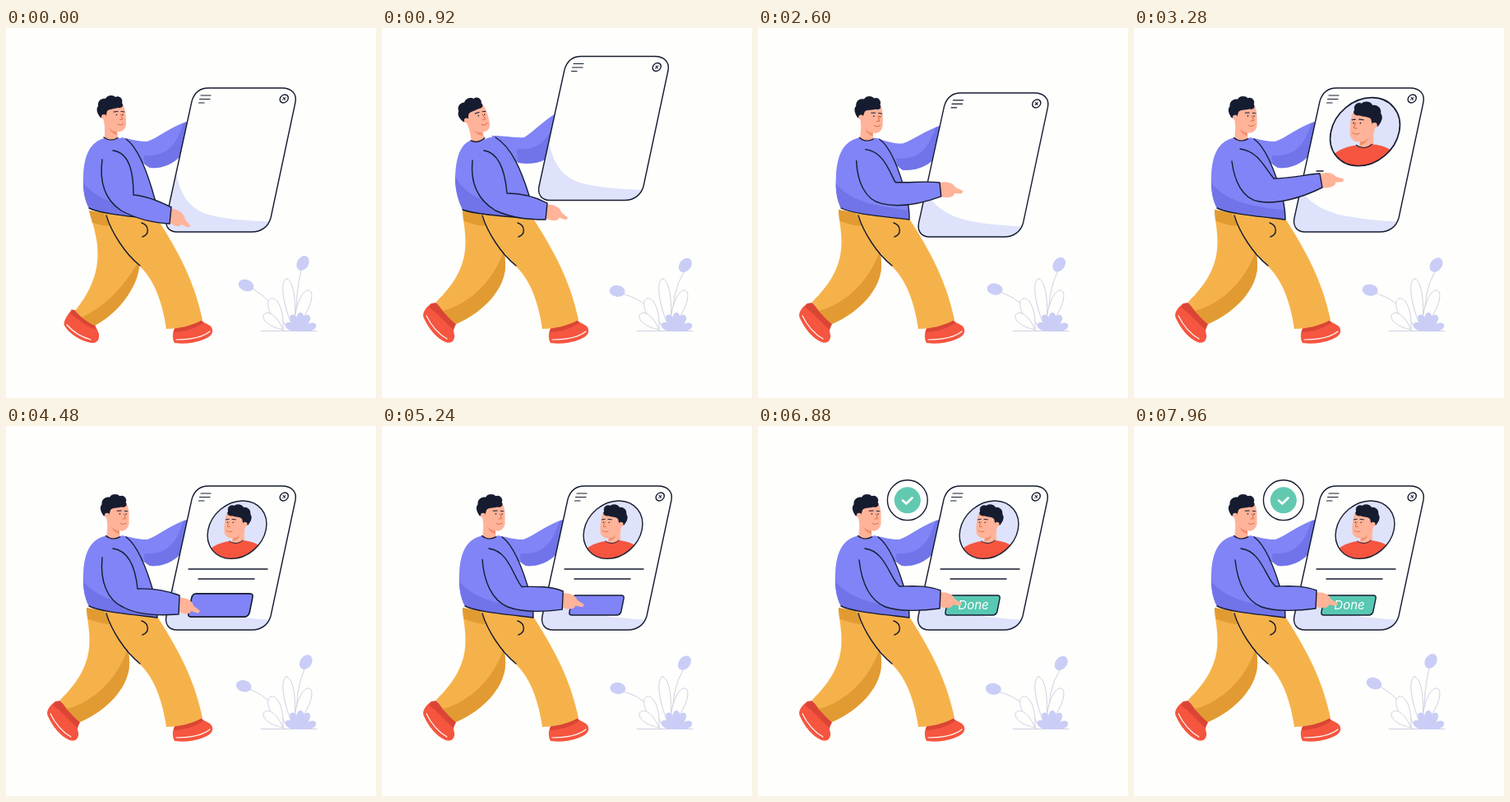
Animation of 450 by 450 pixels, one loop 8 s. Source, as an HTML page with a canvas:

```html
<!DOCTYPE html>
<html lang="en">
<head>
<meta charset="utf-8">
<title>Profile card</title>
<style>
html, body { margin: 0; width: 100%; height: 100%; overflow: hidden; background: #fefefc; }
canvas { display: block; width: 450px; height: 450px; }
</style>
</head>
<body>
<canvas id="stage" width="450" height="450"></canvas>
<script>
const c = document.getElementById('stage').getContext('2d');
const LOOP = 8000, TAU = Math.PI * 2;
const INK = '#161c30', PAPER = '#fefefc', SKIN = '#ffb399', SHIRT = '#8084f6', SHIRT2 = '#7074e8',
  PANTS = '#f6b24a', PANTS2 = '#e29b32', RED = '#f6553f', RED2 = '#db4535',
  PALE = '#dee2fb', PLANT = '#cacdf6', LEAF = '#cbcbe0';

// Key poses; paths of the same name share one structure and can be blended.
const start = {
  head: '0 0 0',
  card: '0 0',
  hand: '200 228 28',
  edge: 'M101,219 C115,226 150,229 184,233 C184,226 184,222 181,208 C172,175 160,145 146,135',
  back: 'C142,133 138,134 136,134 L120,134 C104,138 95,152 94,180 C93,200 97,212 101,219',
  arm: 'M117,160 C113,190 122,210 140,222 C160,233 180,237 199,238 L201,218 C185,210 170,204 155,203 C155,180 152,152 130,149',
  far: 'M140,133 C155,136 162,138 172,138 C184,134 200,120 220,114 L212,156 C202,166 190,171 175,170 L160,160 Z',
  leg: 'M101,222 C108,250 128,290 84,344 C90,351 98,357 108,362 C140,345 162,310 162,288 L150,230 Z',
  legShade: 'M164,278 C150,305 128,335 92,352 L108,364 L180,330 Z',
  shoe: 'M84,344 L80,342 C75,349 69,357 71,362 C78,373 92,381 104,383 C111,384 114,378 113,372 C110,364 108,362 108,360 Z',
  ankle: 'M84,343 L81,343 L78,348 C86,352 98,364 109,366 L108,360 Z',
  sole: 'M74,361 C82,370 92,376 103,379',
  glow: 'M207,176 C212,205 225,222 250,228 C275,234 300,234 324,236 L318,252 L190,252 L190,225 Z'
};
const lifted = {
  ...start,
  head: '-11 2 -12',
  card: '-4 -38.5',
  hand: '200 223 17',
  edge: 'M98,221 C115,227 150,229 184,232 C184,226 182,215 179,204 C170,175 158,145 138,133',
  back: 'C132,132 128,134 126,135 L110,136 C96,140 90,155 89,182 C89,200 94,212 98,221',
  arm: 'M110,161 C107,190 118,210 138,222 C160,232 180,233 199,233 L201,213 C186,205 170,201 152,201 C150,178 144,152 124,149',
  far: 'M133,131 C150,131 162,134 173,133 C186,125 198,111 213,103 L206,155 C195,164 182,166 166,164 L150,155 Z',
  leg: 'M98,221 C99,250 116,285 66,333 C72,342 80,352 90,360 C125,345 152,315 150,285 L145,230 Z',
  legShade: 'M152,255 C144,300 110,335 74,344 L90,362 L170,330 Z',
  shoe: 'M66,336 L60,335 C53,340 48,347 51,353 C57,366 66,377 77,382 C85,385 89,379 88,373 C86,366 88,363 90,360 Z',
  ankle: 'M66,334 L60,335 L57,340 C66,345 76,358 87,367 L90,360 Z',
  sole: 'M54,350 C60,362 68,372 79,378'
};
const lowered = {
  ...lifted,
  head: '10 1 10',
  card: '2.5 27.5',
  hand: '201 236 32',
  edge: 'M101,219 C115,227 150,229 184,233 C185,226 185,222 183,210 C176,175 168,145 154,136',
  back: 'C150,134 147,134 145,134 L128,133 C110,138 100,152 98,182 C96,200 98,212 101,219',
  arm: 'M122,159 C116,190 124,212 142,222 C160,233 180,240 200,244 L203,228 C187,214 172,207 157,205 C157,182 156,152 137,150',
  far: 'M150,135 C165,144 175,150 188,150 C200,148 212,143 225,137 L217,177 C208,182 192,184 177,182 L165,165 Z'
};
const { edge, back, far, card } = start;
const pointing = {
  ...lifted, edge, back, far, card,
  head: '2.5 1 3',
  hand: '228 186 -4',
  arm: 'M119,162 C122,186 132,208 152,211 C175,215 205,206 229,194 L226,177 C210,178 190,183 170,183 C160,172 152,150 129,147',
  glow: 'M203,196 C212,213 235,225 260,229 C280,233 300,234 324,236 L318,252 L190,252 L190,225 Z'
};
const reaching = {
  ...pointing,
  hand: '210 217 18',
  arm: 'M117,160 C114,190 124,212 142,220 C160,230 185,231 210,229 L211,206 C195,200 180,197 160,198 C158,178 152,152 130,149'
};
const pressing = {
  ...pointing,
  hand: '221 211 11',
  arm: 'M123,163 C126,190 136,212 155,220 C172,226 200,225 221,222 L222,200 C205,193 185,195 172,195 C160,185 155,152 130,149'
};
const moves = [[0, 860, lifted], [940, 1820, lowered], [2020, 2860, pointing], [3720, 4320, reaching], [4800, 5400, pressing]];

const NUM = /-?[\d.]+/g;
function mix(a, b, k) {
  const to = b.match(NUM);
  let i = 0;
  return a.replace(NUM, n => (+n + (to[i++] - n) * k).toFixed(2));
}
const nums = s => s.match(NUM).map(Number);

function ease(t, from, to) {
  const k = Math.min(1, Math.max(0, (t - from) / (to - from)));
  return (1 - Math.cos(Math.PI * k)) / 2;
}

const pop = (t, from, peak = 1.18) => peak * ease(t, from, from + 320) - (peak - 1) * ease(t, from + 320, from + 680);

function poseAt(t) {
  let pose = start;
  for (const [from, to, next] of moves) {
    const k = ease(t, from, to), was = pose;
    if (k) pose = Object.fromEntries(Object.keys(next).map(n => [n, mix(was[n], next[n], k)]));
  }
  return pose;
}

function shape(d, fill, stroke, width = 1.4) {
  const p = new Path2D(d);
  if (fill) { c.fillStyle = fill; c.fill(p); }
  if (stroke) { c.strokeStyle = stroke; c.lineWidth = width; c.stroke(p); }
}

function dot(x, y, r, fill, stroke) {
  c.beginPath();
  c.arc(x, y, Math.max(0, r), 0, TAU);
  if (fill) { c.fillStyle = fill; c.fill(); }
  if (stroke) { c.strokeStyle = stroke; c.lineWidth = 1.4; c.stroke(); }
}

function group(draw) { c.save(); draw(); c.restore(); }

function clipped(d, draw) {
  group(() => { c.clip(new Path2D(d)); draw(); });
}

function scaled(x, y, s, draw) {
  if (s > 0) group(() => { c.translate(x, y); c.scale(s, s); c.translate(-x, -y); draw(); });
}

// A loop whose tip touches (tx, ty) and whose widest part is w across.
function petal(bx, by, tx, ty, w, fill, stroke) {
  const dx = tx - bx, dy = ty - by, len = Math.hypot(dx, dy);
  const px = -dy / len * w * 1.75, py = dx / len * w * 1.75;
  const x = bx + dx * 4 / 3, y = by + dy * 4 / 3;
  shape(`M${bx},${by} C${x + px},${y + py} ${x - px},${y - py} ${bx},${by} Z`, fill, stroke, .9);
}

function bloom(x, y, turn) {
  c.fillStyle = PLANT;
  c.beginPath();
  c.ellipse(x, y, 9.5, 7, turn, 0, TAU);
  c.fill();
}

function plant(t) {
  const k = (1 - Math.cos(TAU * t / 2000)) / 2;
  const lx = 292 - 6 * k, ly = 313 + 7 * k, rx = 361 + 8 * k, ry = 286 + 2.5 * k;
  shape(`M310,368.5 H378 M${lx + 8},${ly + 4} Q326,332 340,362 M${rx - 2},${ry + 9} Q352,320 353,362`, null, LEAF, .9);
  bloom(lx, ly, .35 - k * .25);
  bloom(rx, ry, -1.05 + k * .15);
  [[341, 305, 13], [369, 319, 14], [322, 329, 14], [314, 348, 12]].forEach(([x, y, w]) =>
    petal(x < 330 ? 337 : 350, 367, x, y, w, PAPER, LEAF));
  [[340, 360], [347, 349], [358, 346], [368, 349], [377, 361]].forEach(([x, y]) => petal(358, 369, x, y, 9, PLANT));
}

function drawHead() {
  shape('M118,104 C118,112 120,116 120,120 L120,134 C126,138 132,137 136,133 L135,126 C142,127 147,122 146,114 C146,106 145,100 143,94 L125,94 Z', SKIN);
  shape('M125,121 C128,125 132,126 135,126 L135,130 C130,129 127,126 125,121 Z', '#f2906c');
  shape('M115,109 C111,104 109,99 112,95 C111,89 116,85 121,86 C123,81 131,81 133,84 C138,81 143,87 141,91 C144,95 140,98 136,97 C130,99 126,98 123,101 L121,109 Z', INK);
  dot(119, 108, 2.9, SKIN);
  shape('M131,102 L136,101.5 M140,101.5 L144,102', null, INK, 1);
  dot(134.5, 105.5, .8, INK);
  dot(142, 105.5, .8, INK);
  shape('M139.5,105 L142,111 L138.5,111.5 M136,117 Q140,119.5 143,116', null, '#d9633c', .9);
}

function avatar() {
  const disc = new Path2D(), ring = new Path2D();
  disc.arc(0, 0, 35.2, 0, TAU);
  ring.addPath(disc, new DOMMatrix([1, 0, -.2, 1, 281, 126.2]));
  c.fillStyle = PALE;
  c.fill(ring);
  group(() => {
    c.clip(ring);
    group(() => { c.translate(402, 18.5); c.scale(-.935, .935); drawHead(); });
    shape('M238,170 C243,151 252,143 272,140 C277,144 284,143 288,139 C306,141 316,147 322,170 Z', RED);
    shape('M272,140 C277,144 284,143 288,139', null, INK, 1);
  });
  c.strokeStyle = INK;
  c.lineWidth = 1.4;
  c.stroke(ring);
}

function button(t) {
  const k = ease(t, 5640, 6200), from = [128, 132, 246], to = [88, 200, 178];
  const color = from.map((v, i) => Math.round(v + (to[i] - v) * k));
  shape('M236,206 H291 Q295,206 294,210 L291,225 Q290,230 285,230 H231 Q227,230 228,226 L231,211 Q232,206 236,206 Z', `rgb(${color})`, INK);
  c.globalAlpha = ease(t, 5540, 5860);
  c.fillStyle = '#fff';
  c.font = 'italic 15px Inter, sans-serif';
  c.textAlign = 'center';
  c.fillText('Done', 262, 222.5);
  c.globalAlpha = 1;
}

function drawCard(t, pose) {
  const body = 'M246,73 H336 C347,73 354,80 352,90 L322,231 C319,242 310,248 299,248 H208 C198,248 193,241 195,231 L226,89 C229,79 236,73 246,73 Z';
  shape(body, PAPER);
  clipped(body, () => shape(pose.glow, PALE));
  shape(body, null, INK);
  shape('M237,82 H249 M235.5,86.5 H248 M234.5,91 H241', null, INK, 1.2);
  group(() => {
    c.transform(1, 0, -.2, 1, 338.2, 86);
    dot(0, 0, 5, null, INK);
    shape('M-1.3,-1.3 L1.3,1.3 M1.3,-1.3 L-1.3,1.3', null, INK, 1.2);
  });
  scaled(281, 126, pop(t, 2960), avatar);
  const first = ease(t, 3180, 3720), second = ease(t, 3560, 4060);
  if (first) shape(`M222,174 H${222 + 96 * first}`, null, INK);
  if (second) shape(`M234,186 H${234 + 68 * second}`, null, INK);
  scaled(261.5, 218, pop(t, 4160), () => button(t));
}

function badge(t) {
  scaled(181.8, 90.2, pop(t, 5640, 1.09), () => {
    dot(181.8, 90.2, 24.4, PAPER, INK);
    dot(181.8, 90.2, 16 * ease(t, 5800, 6130), '#62c9b0');
    const k = ease(t, 6140, 6480);
    if (!k) return;
    c.setLineDash([20 * k, 40]);
    shape('M176,90.5 L180.3,94.5 L187.5,87.5', null, '#fff', 2.6);
    c.setLineDash([]);
  });
}

function legs(pose) {
  shape(pose.shoe, RED);
  shape(pose.ankle, RED2);
  shape(pose.sole, null, '#fff', 1.2);
  shape(pose.leg, PANTS);
  clipped(pose.leg, () => {
    shape(pose.legShade, PANTS2);
    shape('M95,218 L150,218 L150,240 C125,243 112,240 95,233 Z', PANTS2);
  });
  shape('M206,363 C202,370 202,378 205,383 C216,385 230,383 240,379 C248,376 252,372 251,367 C250,360 243,361 237,355 Z', RED);
  shape('M206,362 L204,370 C216,370 228,366 240,359 L237,354 Z', RED2);
  shape('M207,379 C222,379 238,377 248,369', null, '#fff', 1.2);
  shape('M118,224 C130,245 150,278 163,290 C182,308 191,338 195,366 C210,366 226,362 239,355 C231,318 218,285 186,235 L180,228 Z', PANTS);
  shape('M122,228 C128,248 145,275 163,289 M165,237 C174,240 175,251 166,254', null, INK);
}

function frame(t) {
  const pose = poseAt(t), [cx, cy] = nums(pose.card), [hx, hy, tilt] = nums(pose.head), [wx, wy, turn] = nums(pose.hand);
  c.fillStyle = PAPER;
  c.fillRect(0, 0, 450, 450);
  plant(t);

  shape(pose.far, SHIRT);
  clipped(pose.far, () => {
    c.translate(cx, cy * (cy < 0 ? .2 : .6));
    shape('M216,114 C206,150 190,156 168,155 L170,185 L212,180 L230,112 Z', SHIRT2);
  });
  group(() => { c.translate(cx, cy); drawCard(t, pose); });
  badge(t);
  legs(pose);

  const torso = pose.edge + pose.back + 'Z';
  shape(torso, SHIRT);
  clipped(torso, () => shape('M85,172 C98,206 130,217 190,222 L190,240 L85,240 Z', SHIRT2));
  shape(pose.edge, null, INK);

  group(() => {
    c.translate(128 + hx, 134 + hy);
    c.rotate(tilt * Math.PI / 180);
    c.translate(-128, -134);
    drawHead();
    shape('M119,133 Q127,139 136,133.5', null, INK);
  });

  group(() => {
    c.translate(wx, wy);
    c.rotate(turn * Math.PI / 180);
    shape('M-3,-8 C6,-11 14,-10 18,-4 L26,-1 C28,0 27,3 24,3 L17,3 C17,8 10,10 -2,8 Z', SKIN);
  });
  shape(pose.arm, SHIRT, INK);
}

c.lineCap = c.lineJoin = 'round';
function tick() {
  frame(performance.now() % LOOP);
  requestAnimationFrame(tick);
}
tick();
</script>
</body>
</html>
```
